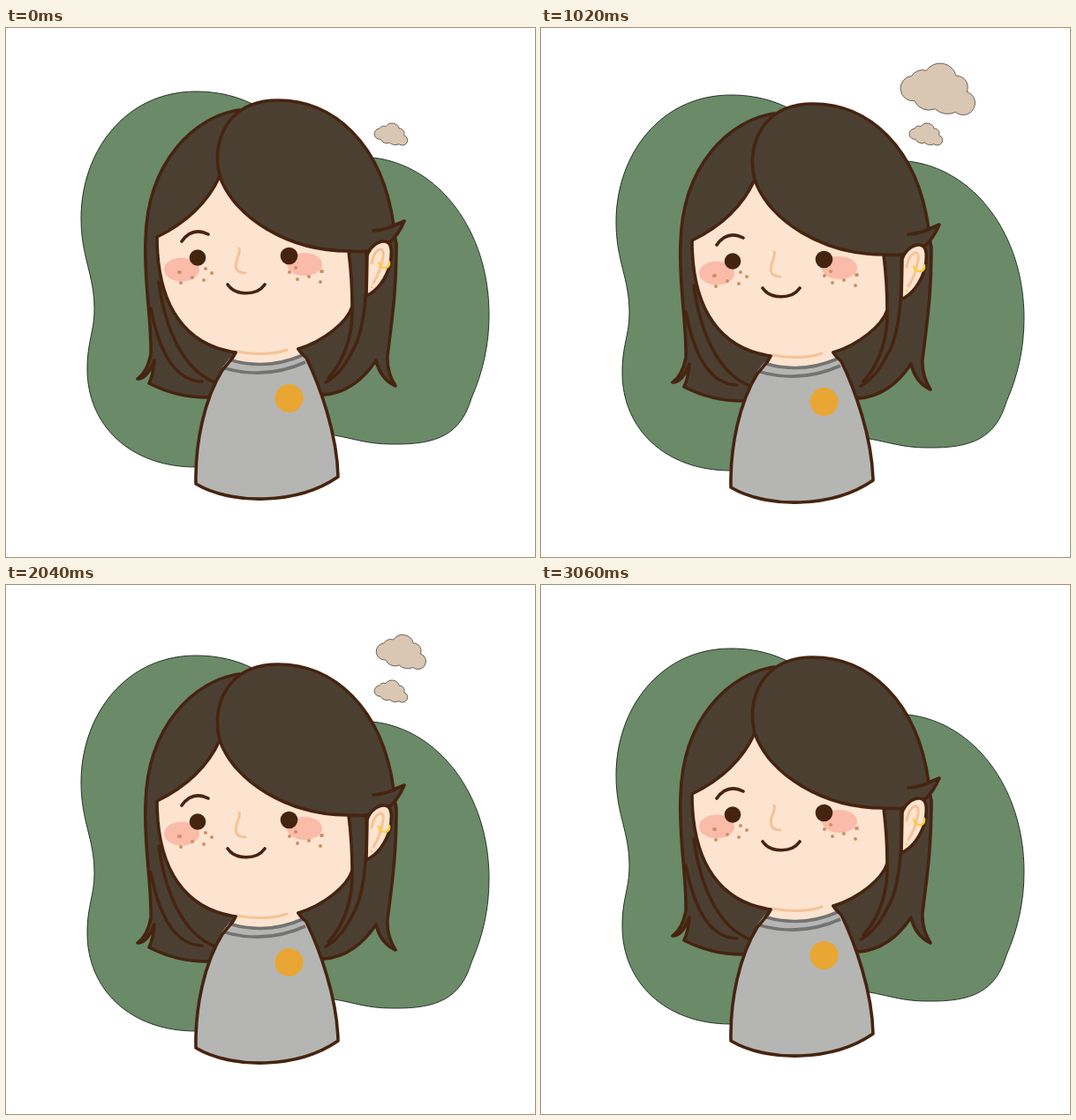
An HTML page that plays this animation: 599 by 600 pixels, repeating every 3400 ms.

```html
<!DOCTYPE html>
<html lang="en">
<head>
<meta charset="utf-8">
<title>Daydreaming girl</title>
<style>
  html, body { margin: 0; width: 100%; height: 100%; overflow: hidden; background: #fff; }
  svg { display: block; }
  .ink { stroke: #46240f; stroke-width: 3.6; stroke-linecap: round; stroke-linejoin: round; }
  .hair { fill: #4b3f32; }
  .skin { fill: #fde4d0; }
  .line { fill: none; }
  .peach { fill: none; stroke: #f5c396; stroke-width: 3; stroke-linecap: round; }
  .collar { fill: none; stroke: #737373; stroke-width: 3.6; }
  .cheek { fill: #fabba9; }
  .freckles { fill: none; stroke: #cf8f60; stroke-width: 4; stroke-linecap: round; }
  .eye { fill: #44230f; }
  .gold { fill: none; stroke: #ffcc33; stroke-width: 2.4; stroke-linecap: round; }
  .cloud { fill: #d9c7b4; stroke: #4a4038; stroke-width: .8; vector-effect: non-scaling-stroke; }
</style>
</head>
<body>
<svg width="599" height="600" viewBox="0 0 599 600">
  <defs>
    <path id="cloud" class="cloud" transform="translate(-451.5 -67)" d="M412 47A19 19 0 0 1 434 39A25 25 0 0 1 479 47A17 17 0 0 1 495 71A18 18 0 1 1 478 102A28 28 0 0 1 447 97A24 24 0 0 1 416 85A19 19 0 0 1 412 47Z"/>
  </defs>

  <g id="girl">
    <path fill="#6a8a68" stroke="#1d261c" stroke-width=".9" d="M215 72C135 72 85 140 85 216C85 260 100 280 100 318C100 345 92 355 92 387C92 450 140 498 215 498C270 498 330 462 372 462C395 466 410 472 437 472C490 473 515 460 527 420C540 390 547 360 547 325C547 230 490 155 415 147L300 98C275 82 250 72 215 72Z"/>

    <!-- back hair -->
    <path class="hair ink" d="M264 93C215 100 160 150 158 240C156 290 165 330 164 370Q160 390 149 398Q160 398 168 377Q167 392 162 403Q195 420 232 419L300 380L360 416C385 414 405 398 419 377Q424 398 441 406Q431 390 432 372C437 330 442 300 442 245L438 225L300 110Z"/>
    <path class="line ink" d="M164 318C172 360 188 400 222 401M173 288C180 340 200 388 237 402"/>

    <!-- neck and face -->
    <path class="skin" d="M260 360H331L334 372Q295 389 258 376Z"/>
    <path class="skin" d="M171 237Q222 212 242 168C258 215 320 253 388 253Q392 285 392 316C386 334 360 355 331 364L260 368C205 360 171 318 171 237Z"/>
    <path class="line ink" d="M331 364C360 355 386 334 392 316Q392 285 388 253M242 168Q222 212 171 237C171 318 205 360 260 368"/>
    <path class="line ink" d="M408 252C410 300 405 345 393 365Q380 392 362 402M392 316C393 345 385 375 365 397"/>
    <path class="peach" d="M262 367Q295 373 318 365M264 250C267 254 256 268 262 275Q266 278 271 278"/>

    <!-- fringe and ear -->
    <path class="hair ink" d="M242 168C232 130 250 82 308 82C370 82 426 130 439 224L451 219Q445 233 436 242L409 253Q402 254 388 253C320 253 258 215 242 168Z"/>
    <path class="line ink" d="M416 230Q429 229 440 224"/>
    <path class="skin ink" d="M409 258C412 248 422 241 429 242C438 243 437 256 435 268C430 285 420 298 408 304Z"/>
    <path class="peach" d="M414 267C417 250 429 245 427 259Q424 277 416 289"/>
    <path class="gold" d="M422 266Q424 273 430 272Q435 271 434 265M414 294h.1"/>

    <!-- features -->
    <ellipse class="cheek" cx="199" cy="274" rx="20" ry="13.5"/>
    <ellipse class="cheek" cx="338" cy="268" rx="20" ry="13"/>
    <path id="freckles" class="freckles" d="M196 277h1M198 289h0M211 283h0M224 286h0M226 273h0M233 278h0"/>
    <use href="#freckles" transform="translate(554 -1) scale(-1 1)"/>
    <path class="line ink" d="M199 242Q211 225 229 234M251 291C260 304 284 304 293 291"/>
    <circle class="eye" cx="217" cy="260.5" r="9.3"/>
    <circle class="eye" cx="320.5" cy="258.5" r="9.8"/>

    <!-- shirt -->
    <path fill="#b5b5b4" d="M252 376Q295 389 336 371L340 374C355 405 375 460 376 509C330 541 255 541 215 517C214 470 225 420 245 385Z"/>
    <path class="collar" d="M252 376Q295 389 336 371M248 386Q295 399 339 379"/>
    <path class="line ink" d="M260 368Q259 372 245 388C225 420 214 470 215 517C255 541 330 541 376 509C375 460 355 405 340 374Q333 368 331 364"/>
    <circle cx="320.5" cy="420" r="16" fill="#e9a632"/>
  </g>

  <use id="small" href="#cloud" transform="translate(436 120.5) scale(.335 .32)"/>
  <use id="big" href="#cloud"/>
</svg>
<script>
const $ = id => document.getElementById(id);
const show = (id, on) => $(id).style.display = on ? '' : 'none';

const STEP = 340, STEPS = 10, PEAK = 5;

function draw(time) {
  const step = Math.floor(time / STEP) % STEPS;
  // thought grows to its peak and shrinks back to nothing
  const size = PEAK - Math.abs(step - PEAK + 1);
  const left = PEAK - size;

  const bob = Math.max(0, Math.min(5 * (size - 1), 4 * left));
  $('girl').setAttribute('transform', `translate(0 ${bob})`);

  show('small', size > 0);
  show('big', size > 1);
  const x = 451.5 - 2 * left;
  const y = Math.min(81, 67 + 2.25 * left ** 2);
  $('big').setAttribute('transform', `translate(${x} ${y}) scale(${1 - left / 4})`);
}

const start = performance.now();
function tick() {
  draw(performance.now() - start);
  requestAnimationFrame(tick);
}
tick();
</script>
</body>
</html>
```
